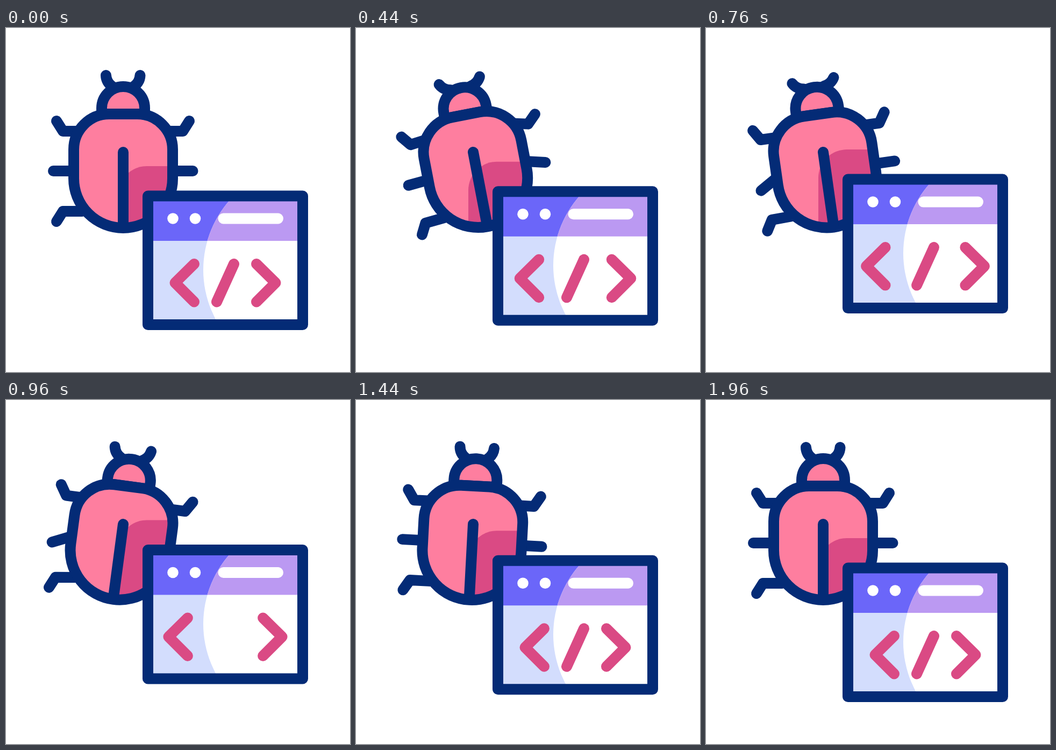
An HTML page that plays this animation: 640x640 px, repeating every 2 s.

```html
<!DOCTYPE html>
<html lang="en">
<head>
<meta charset="utf-8">
<title>Bug and code window</title>
<style>
  html, body { margin: 0; width: 100%; height: 100%; overflow: hidden; background: #fff; }
  svg { display: block; width: 100%; height: 100%; }
  .line { fill: none; stroke: #042b76; stroke-width: 20; stroke-linecap: round; stroke-linejoin: round; }
  .code { stroke: #da4a84; }
  .light { stroke: #fff; }
  .skin { fill: #fe7e9f; }
</style>
</head>
<body>
<svg viewBox="0 0 640 640">
  <defs>
    <path id="shell" d="M192 160H244A66 66 0 0 1 310 226V280A92 92 0 0 1 126 280V226A66 66 0 0 1 192 160Z"/>
    <clipPath id="shellClip"><use id="clipShell" href="#shell"/></clipPath>
    <clipPath id="pane"><rect x="264" y="313" width="288" height="239"/></clipPath>
  </defs>

  <g id="limbs" class="line">
    <path id="legUL" d="M94 173L106 192H137"/>
    <path id="legML" d="M88 266H126"/>
    <path id="legLL" d="M94 360L106 341H142"/>
    <path id="legUR" d="M341 173L329 192H299"/>
    <path id="legMR" d="M347.500 266H310"/>
    <path id="antennaL" d="M186 88Q186.500 101 198 109"/>
    <path id="antennaR" d="M249.500 88Q249 101 237.500 109"/>
  </g>
  <g id="body">
    <path class="line skin" style="fill:#fe7e9f" d="M178 160V149A40 40 0 0 1 258 149V160Z"/>
    <use href="#shell" class="skin"/>
  </g>
  <g clip-path="url(#shellClip)">
    <path id="shade" fill="#da4a84" d="M209 640V310A53 53 0 0 1 262 257H420V640Z"/>
  </g>
  <g id="outline" class="line">
    <use href="#shell"/>
    <path d="M218 231V366"/>
  </g>

  <g id="window">
    <g clip-path="url(#pane)">
      <rect x="264" y="313" width="288" height="239" fill="#d3ddfd"/>
      <rect x="264" y="313" width="288" height="83" fill="#6b66f9"/>
      <circle cx="562" cy="450" r="195" fill="#fff"/>
      <clipPath id="header"><rect x="264" y="313" width="288" height="83"/></clipPath>
      <circle cx="562" cy="450" r="195" fill="#bb99f2" clip-path="url(#header)"/>
    </g>
    <rect class="line" x="264" y="312.500" width="288" height="239.500"/>
    <circle cx="310.500" cy="354.500" r="10.300" fill="#fff"/>
    <circle cx="352" cy="354.500" r="10.300" fill="#fff"/>
    <path class="line light" d="M404.500 354.500H506"/>
    <path id="open" class="line code" d="M350 439L314.500 474L350 509.500"/>
    <path id="slash" class="line code" d="M424 439L392 509.500"/>
    <path id="close" class="line code" d="M466 439L501.500 474L466 509.500"/>
  </g>
</svg>
<script>
const LOOP = 2000, STEP = 40;
const part = id => document.getElementById(id);
const setTransform = (id, value) => part(id).setAttribute('transform', value);
const shift = (id, x, y) => setTransform(id, `translate(${x} ${y})`);
const turn = (id, angle, x, y) => setTransform(id, `rotate(${angle} ${x} ${y})`);
const clamp = x => Math.min(1, Math.max(0, x));

// Cubic Bezier easing with control points (.73, 0) and (.475, 1)
function ease(x) {
  x = clamp(x);
  let low = 0, high = 1;
  for (let i = 0; i < 24; i++) {
    const s = (low + high) / 2, r = 1 - s;
    if (3 * r * r * s * 0.73 + 3 * r * s * s * 0.475 + s ** 3 < x) low = s; else high = s;
  }
  return low * low * (3 - 2 * low);
}

// Eases up for half of the span, then retraces the way back
const thereAndBack = (t, end, rise = end / 2) => ease(Math.min(t, end - t) / rise);

// Smooth swing that is zero at both ends
const swing = (t, start, end) => Math.sin(Math.PI * clamp((t - start) / (end - start))) ** 2;

function tilt(t) {
  const keys = [[0, 0], [540, -11.5], [1100, 10.2], [1620, 0]];
  for (let i = 1; i < keys.length; i++) {
    const [t0, a] = keys[i - 1], [t1, b] = keys[i];
    if (t < t1) return a + (b - a) * ease((t - t0) / (t1 - t0));
  }
  return 0;
}

function draw(t) {
  const angle = tilt(t);
  for (const id of ['limbs', 'body', 'outline', 'clipShell']) turn(id, angle, 217.5, 231);

  turn('legUL', -12 * swing(t, 0, 600), 137, 192);
  turn('legML', -32 * swing(t, 320, 1280), 126, 266);
  turn('legLL', -7 * (swing(t, 0, 640) + swing(t, 640, 1280)), 142, 341);
  turn('legUR', 15 * swing(t, 0, 720), 299, 192);
  turn('legMR', 25 * swing(t, 0, 600), 310, 266);

  const spread = 30 * thereAndBack(t, 1240);
  turn('antennaL', -spread, 200, 107);
  turn('antennaR', spread, 236, 107);

  const lift = -33.5 * thereAndBack(t, 1960, 960);
  shift('window', 0, lift);
  shift('shade', 0, lift);

  const gap = 16.5 * thereAndBack(t, 1440);
  shift('open', -gap, 0);
  shift('close', gap, 0);
  part('slash').setAttribute('visibility', t >= 800 && t < 1120 ? 'hidden' : 'visible');
}

const start = performance.now();
function tick() {
  const t = (performance.now() - start) % LOOP;
  draw(Math.floor(t / STEP) * STEP);
  requestAnimationFrame(tick);
}
tick();
</script>
</body>
</html>
```
